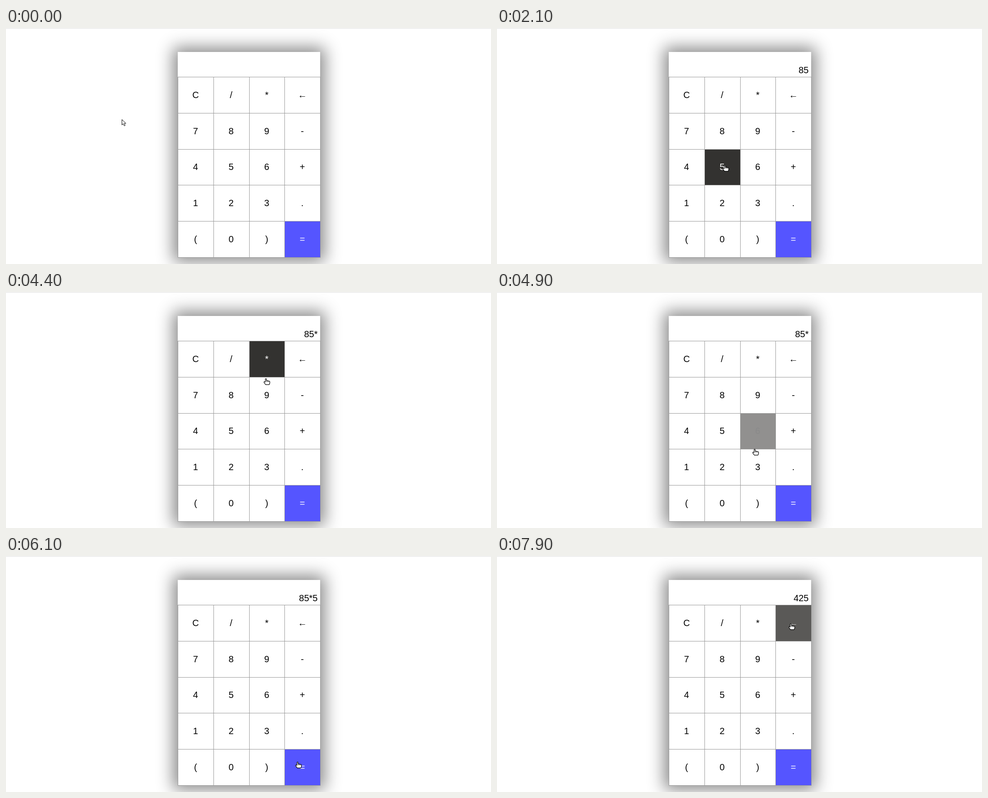
These frames come from a looping animation (1073 by 522 pixels, 8 s). An HTML page:

```html
<!DOCTYPE html>
<html lang="en">
<head>
<meta charset="utf-8">
<title>Calculator</title>
<style>
  html, body { margin: 0; width: 100%; height: 100%; overflow: hidden; background: #fff; }
  #stage { position: absolute; left: 0; top: 0; width: 1073px; height: 522px; overflow: hidden; }
  #case { position: absolute; left: 380px; top: 53px; width: 315px; height: 454px;
          background: #fff; box-shadow: 0 0 34px 10px #8a8a8a; }
  svg { position: absolute; left: 0; top: 0; }
  text { font: 20px "Liberation Sans", Arial, sans-serif; }
  #keys text { text-anchor: middle; }
  #display { text-anchor: end; }
  #keys rect, #grid { shape-rendering: crispEdges; }
  #grid { stroke: #999; fill: none; }
  .cursor { fill: #fff; stroke: #000; stroke-linejoin: round; }
</style>
</head>
<body>
<div id="stage">
  <div id="case"></div>
  <svg width="1073" height="522">
    <rect width="1073" height="1" fill="#ddd"/>
    <g id="keys"></g>
    <path id="grid"/>
    <text id="display" x="689.5" y="100"></text>
    <path id="arrow" class="cursor" d="M.5 .5V12.4L3.3 9.8L5.5 14.5L7.7 13.5L5.6 9H9.3Z"/>
    <g id="hand">
      <path class="cursor" stroke-width="1.2" d="M-1.2 6.8V1Q-1.2-.4 0-.4T1.3 1V4.2Q2.8 3.6 3.7 4.6Q5.2 4 6 5.1Q8.6 4.6 8.6 7V9.5L7.4 12.8H-.6L-4 8.3Q-4.8 6.8-3.4 6.2Q-2.3 6-1.2 7.8"/>
      <path d="M1.6 5V7M3.9 5.3V7M6.1 5.8V7" stroke="#000" stroke-width=".8" fill="none"/>
    </g>
  </svg>
</div>
<script>
const LOOP = 8000, STEP = 100;
const LEFT = 380, TOP = 108, KEY_W = 78.75, KEY_H = 79.75;
const FADE_IN = .27, FADE_OUT = .55;
const labels = "C/*←789-456+123.(0)=";
const white = [255, 255, 255], black = [0, 0, 0], dark = [51, 50, 48];

const start = { x: 256, y: 202 };
// Pointer moves: begin, end, x, y; it rests in between
const moves = [
  [200, 900, 497, 240], [1100, 1400, 500, 268], [1400, 1800, 504, 304],
  [2300, 2400, 534, 304], [2600, 2900, 616, 256], [3000, 3300, 630, 233],
  [3400, 3800, 577, 155], [4200, 4400, 575, 192], [4400, 4900, 570, 348],
  [4900, 5100, 539, 261], [5200, 5500, 505, 305], [5800, 6000, 645, 456],
  [6200, 6400, 654, 468], [7000, 7400, 648, 248], [7500, 7600, 650, 180],
  [7600, 7900, 650, 150]
];
const entries = [[0, ""], [1100, "8"], [2100, "85"], [4200, "85*"], [5600, "85*5"], [6600, "425"]];

const byId = id => document.getElementById(id);
const columnX = c => Math.round(LEFT + KEY_W * c);
const rowY = r => Math.round(TOP + KEY_H * r);
const blend = (a, b, k) => `rgb(${a.map((v, i) => Math.round(v + (b[i] - v) * k))})`;

function pointerAt(time) {
  let { x, y } = start;
  for (const [begin, end, toX, toY] of moves) {
    const k = Math.min(1, Math.max(0, (time - begin) / (end - begin)));
    x += (toX - x) * k;
    y += (toY - y) * k;
  }
  return { x, y };
}

function keyUnder({ x, y }) {
  const c = Math.floor((x - LEFT) / KEY_W), r = Math.floor((y - TOP) / KEY_H);
  return c < 0 || c > 3 || r < 0 || r > 4 ? -1 : r * 4 + c;
}

// Hover strength of every key at each step, one step behind the pointer
const hover = [Array(labels.length).fill(0)];
for (let time = 0; time < LOOP - STEP; time += STEP) {
  const active = keyUnder(pointerAt(time));
  hover.push(hover[hover.length - 1].map((amount, i) =>
    i === active ? Math.min(1, amount + FADE_IN) : Math.max(0, amount - FADE_OUT)));
}

function add(tag, attributes) {
  const node = document.createElementNS("http://www.w3.org/2000/svg", tag);
  for (const name in attributes) node.setAttribute(name, attributes[name]);
  return byId("keys").appendChild(node);
}

const keys = [...labels].map((label, i) => {
  const c = i % 4, r = Math.floor(i / 4), x = columnX(c), y = rowY(r);
  const equals = label === "=";
  const box = add("rect", {
    x, y, width: columnX(c + 1) - x, height: rowY(r + 1) - y, fill: equals ? "#5555ff" : "#fff"
  });
  const text = add("text", {
    x: LEFT + KEY_W * (c + .5), y: Math.floor(TOP + 47.4 + KEY_H * r), fill: equals ? "#fff" : "#000"
  });
  text.textContent = label;
  return { equals, box, text };
});

let lines = "";
for (let c = 0; c <= 4; c++) lines += `M${columnX(c) + .5} ${TOP}V${rowY(5) + 1}`;
for (let r = 0; r <= 5; r++) lines += `M${LEFT} ${rowY(r) + .5}H${columnX(4) + 1}`;
byId("grid").setAttribute("d", lines);

function draw() {
  const step = Math.floor(performance.now() % LOOP / STEP), time = step * STEP;
  keys.forEach(({ equals, box, text }, i) => {
    if (equals) return;
    box.setAttribute("fill", blend(white, dark, hover[step][i]));
    text.setAttribute("fill", blend(black, white, hover[step][i]));
  });
  byId("display").textContent = entries.filter(e => e[0] <= time).pop()[1];

  const { x, y } = pointerAt(time);
  const overKeys = x >= LEFT;
  byId("arrow").style.display = overKeys ? "none" : "";
  byId("hand").style.display = overKeys ? "" : "none";
  byId(overKeys ? "hand" : "arrow").setAttribute("transform", `translate(${Math.round(x)} ${Math.round(y)})`);
  requestAnimationFrame(draw);
}
draw();
</script>
</body>
</html>
```
